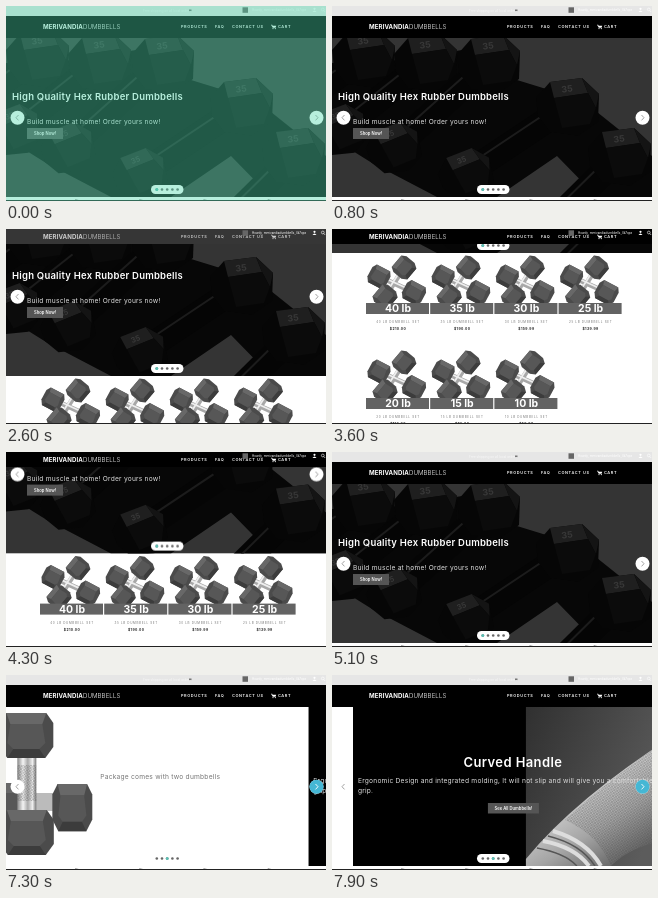
Write an HTML page that moves like this. It is 320x195 px and loops after 8 s.

```html
<!DOCTYPE html>
<html lang="en">
<head>
<meta charset="utf-8">
<title>Dumbbell shop</title>
<style>
  html, body { margin: 0; width: 100%; height: 100%; overflow: hidden; background: #fff; }
  svg.stage { display: block; width: 100vw; height: 100vh; font-family: Inter, "Open Sans", sans-serif; }
  :root { --t: 0ms; }

  /* Every animation is paused and positioned by the clock in --t. */
  .anim { animation: var(--name) var(--dur) var(--ease, linear) both paused; animation-delay: calc(var(--at) - var(--t)); }
  .tint   { --name: fade; --dur: 800ms; --at: 0ms; }
  .scroll { --name: scroll; --dur: 3200ms; --at: 1900ms; }
  .sticky { --name: sticky; --dur: 2400ms; --at: 2300ms; }
  .darken { --name: darken; --dur: 600ms; --at: 2300ms; }
  .menu   { --name: show; --dur: 400ms; --at: 2300ms; }
  .hover  { --name: show; --dur: 300ms; --at: 5800ms; }
  .first, .second { --name: slide; --dur: 880ms; --ease: cubic-bezier(.37, 0, .63, 1); }
  .first  { --at: 6286ms; }
  .second { --at: 7166ms; }
  .dot    { --name: hop; --dur: 1ms; }
  .dot.one { --at: 6286ms; }
  .dot.two { --at: 7166ms; }

  @keyframes fade { to { opacity: 0; } }
  @keyframes show { from { opacity: 0; } }
  @keyframes darken { from { fill: #6c6c6c; } to { fill: #000; } }
  @keyframes slide { to { transform: translateX(-320px); } }
  @keyframes hop { to { transform: translateX(5.2px); } }
  @keyframes scroll {
    0% { transform: none; animation-timing-function: cubic-bezier(.45, 0, .8, .6); }
    21.875% { transform: translateY(-44px); animation-timing-function: cubic-bezier(.3, .35, .6, 1); }
    53.125% { transform: translateY(-167px); }
    56.25% { transform: translateY(-168px); animation-timing-function: cubic-bezier(.45, 0, .4, 1); }
    100% { transform: none; }
  }
  @keyframes sticky {
    0%, 100% { opacity: 0; }
    10%, 90% { opacity: 1; }
  }

  .nav { fill: #fff; font-size: 3.9px; font-weight: 600; letter-spacing: .6px; }
  .logo { fill: #fff; font-size: 6.1px; font-weight: 300; letter-spacing: .09px; }
  .bold { font-weight: 700; }
  .title { fill: #fff; font-weight: 600; }
  .lead { fill: #ddd; font-size: 6.65px; letter-spacing: .22px; }
  .button { fill: #fff; font-size: 4.2px; font-weight: 600; }
  .mid { text-anchor: middle; }
  .weight { fill: #fff; font-size: 10.5px; font-weight: 700; }
  .name { fill: #777; font-size: 3px; letter-spacing: .65px; }
  .price { fill: #222; font-size: 3.4px; font-weight: 700; letter-spacing: .4px; }
</style>
</head>
<body>
<svg class="stage" viewBox="0 0 320 195" preserveAspectRatio="none">
  <defs>
    <linearGradient id="chrome">
      <stop offset="0" stop-color="#888"/><stop offset=".3" stop-color="#f4f4f4"/>
      <stop offset=".55" stop-color="#aaa"/><stop offset=".8" stop-color="#eee"/><stop offset="1" stop-color="#777"/>
    </linearGradient>
    <linearGradient id="backdrop" x2="1" y2=".4">
      <stop offset="0" stop-color="#303030"/><stop offset="1" stop-color="#5c5c5c"/>
    </linearGradient>
    <linearGradient id="grip" x1=".25" y1=".3" x2=".75" y2="1">
      <stop offset="0" stop-color="#777"/><stop offset=".25" stop-color="#c8c8c8"/>
      <stop offset=".55" stop-color="#a5a5a5"/><stop offset="1" stop-color="#555"/>
    </linearGradient>
    <pattern id="knurl" width="3" height="3" patternUnits="userSpaceOnUse" patternTransform="rotate(12)">
      <path d="M0 0L3 3M3 0L0 3" stroke="#444" stroke-width=".5" opacity=".55"/>
    </pattern>

    <!-- rubber head, dark, label on its upper facet -->
    <g id="head">
      <path d="M-32-8L-18-24 14-28 31-12 30 16 10 30-18 26-30 10Z" fill="#060606"/>
      <path d="M-18-24L14-28 20-13-14-8Z" fill="#1f1f1f"/>
      <path d="M14-28L31-12 28 2 20-13Z" fill="#141414"/>
      <path d="M-14-8L20-13 28 2 22 18-6 22Z" fill="#0b0b0b"/>
      <text class="mid" x="1" y="-14" font-size="9" font-weight="700" fill="#383838" transform="rotate(-7)">35</text>
    </g>

    <!-- rubber head, grey -->
    <g id="block">
      <path d="M-20-22H20L27-12V12L19 23H-19L-27 12V-12Z" fill="#4b4b4b"/>
      <path d="M-20-22H20L16-11H-16Z" fill="#686868"/>
      <path d="M-16-11H16L19 8 13 14H-13L-19 8Z" fill="#575757"/>
      <path d="M-13 14H13L19 23H-19Z" fill="#3c3c3c"/>
    </g>

    <g id="pair">
      <g fill="none" stroke-width="5" stroke="#a8a8a8">
        <path d="M12 20L47 36M37 11L18 41"/>
        <path d="M12 19L47 35M36 10L17 40" stroke="#eee" stroke-width="1.8"/>
      </g>
      <use href="#block" transform="translate(12 20) rotate(28) scale(.38 .44)"/>
      <use href="#block" transform="translate(37 11) rotate(-50) scale(.38 .44)"/>
      <use href="#block" transform="translate(18 40) rotate(-50) scale(.4 .44)"/>
      <use href="#block" transform="translate(47 36) rotate(28) scale(.4 .45)"/>
    </g>

    <g id="menu">
      <text class="logo" x="37" y="2.2"><tspan class="bold">MERIVANDIA</tspan>DUMBBELLS</text>
      <g class="nav">
        <text x="175" y="1.5">PRODUCTS</text>
        <text x="209" y="1.5">FAQ</text>
        <text x="226" y="1.5">CONTACT US</text>
        <text x="272" y="1.5">CART</text>
        <path d="M265-2h1.2l.4 1h3.6l-.7 2h-2.7z"/>
        <circle cx="267" cy="1.9" r=".6"/><circle cx="269.3" cy="1.9" r=".6"/>
      </g>
    </g>
  </defs>

  <rect width="320" height="195" fill="#fff"/>

  <g class="anim scroll">
    <rect width="320" height="11" fill="#e6e6e6"/>
    <text x="137" y="5.5" font-size="3.2" fill="#f8f8f8">Free shipping on all local orders</text>
    <rect x="183" y="3.5" width="2.5" height="1.6" fill="#777"/>
    <rect y="10" width="320" height="22" fill="#000"/>
    <use href="#menu" y="20.7"/>

    <g class="anim first"><g class="anim second">
      <svg y="32" width="320" height="159">
        <rect width="320" height="159" fill="#343434"/>
        <path d="M0 25L70 22 130 12 185 42 250 62 320 118V159H265L225 118 165 159H105L40 125 0 100Z" fill="#070707"/>
        <g id="rack"></g>
        <text class="title" x="6" y="62" font-size="9.5" letter-spacing=".22">High Quality Hex Rubber Dumbbells</text>
        <text class="lead" x="21" y="86">Build muscle at home! Order yours now!</text>
        <rect x="21" y="90" width="36" height="11" fill="#555"/>
        <text class="button mid" x="39" y="97">Shop Now!</text>
      </svg>

      <svg x="320" y="32" width="320" height="159">
        <rect width="320" height="159" fill="#fff"/>
        <rect x="20" y="86" width="70" height="18" fill="#bbb"/>
        <use href="#block" transform="translate(22 97) scale(.62 .95)"/>
        <use href="#block" transform="translate(84 100) scale(.74 1.05)"/>
        <rect x="29" y="46" width="19" height="60" fill="url(#chrome)"/>
        <rect x="29" y="58" width="19" height="36" fill="url(#knurl)"/>
        <use href="#block" transform="translate(38 28)"/>
        <use href="#block" transform="translate(38.5 125)"/>
        <text class="lead" x="112" y="72" style="fill:#777">Package comes with two dumbbells</text>
      </svg>

      <svg x="640" y="32" width="320" height="159">
        <rect width="320" height="159" fill="#000"/>
        <rect x="173" width="147" height="159" fill="url(#backdrop)"/>
        <g id="bar">
          <path d="M173 152Q222 92 320 29V132Q278 138 258 159H173Z" fill="url(#grip)"/>
          <path d="M212 113Q258 70 320 29V132Q278 138 258 159Q246 128 212 113Z" fill="url(#knurl)"/>
          <path d="M190 134Q222 140 236 159M200 124Q234 134 248 159" fill="none" stroke="#ddd" stroke-width="4"/>
          <path d="M195 129Q228 137 242 159M184 141Q212 146 224 159" fill="none" stroke="#555" stroke-width="1.5"/>
        </g>
        <text class="title mid" x="160" y="60" font-size="13" letter-spacing=".4">Curved Handle</text>
        <text class="lead" x="5" y="76">Ergonomic Design and integrated molding, It will not slip and will give you a comfortable</text>
        <text class="lead" x="5" y="86">grip.</text>
        <rect x="135" y="96" width="51" height="10.5" fill="#555"/>
        <text class="button mid" x="160.5" y="102.7">See All Dumbbells!</text>
      </svg>
    </g></g>

    <g fill="none" stroke="#999" stroke-width=".9">
      <circle cx="11.5" cy="111.7" r="7" fill="#fff" stroke="none"/>
      <path d="M12.5 109l-2.5 2.7 2.5 2.7"/>
      <circle cx="310.5" cy="111.7" r="7" fill="#fff" stroke="none"/>
      <path d="M309.5 109l2.5 2.7-2.5 2.7"/>
      <g class="anim hover">
        <circle cx="310.5" cy="111.7" r="7" fill="#45b7d4" stroke="none"/>
        <path d="M309.5 109l2.5 2.7-2.5 2.7" stroke="#fff"/>
      </g>
    </g>

    <rect x="145" y="179" width="32.5" height="9" rx="4.5" fill="#fff"/>
    <g id="dots" fill="#666"></g>
    <g class="anim dot one"><circle class="anim dot two" cx="150.8" cy="183.5" r="1.5" fill="#5cc0b4"/></g>

    <g id="shop"></g>
  </g>

  <g class="anim sticky">
    <rect class="anim darken" width="320" height="15"/>
    <g class="anim menu"><use href="#menu" y="7.7"/></g>
  </g>

  <g fill="#fff">
    <rect x="236.5" y="1.3" width="5.5" height="5.5" fill="#666"/>
    <text x="246" y="5" font-size="3.05">Howdy, merivandiadumbbells_4k7qpz</text>
    <circle cx="308.5" cy="2.8" r="1.1"/><path d="M306.5 6q2-3 4 0z"/>
    <circle cx="316.8" cy="3.5" r="1.4" fill="none" stroke="#fff" stroke-width=".6"/>
    <path d="M317.8 4.5l1.3 1.4" stroke="#fff" stroke-width=".7"/>
  </g>

  <rect y="194" width="320" height="1" fill="#222"/>
  <rect class="anim tint" width="320" height="195" fill="rgba(76, 215, 170, .4)"/>
</svg>

<script>
  const fill = (id, html) => document.getElementById(id).innerHTML = html;
  const use = (id, x, y, more = '') => `<use href="#${id}" transform="translate(${x} ${y}) ${more}"/>`;

  // Each dumbbell: far head x, y, near head x, y.
  const bells = [[32, 20, -40, 70], [94, 24, 8, 92], [157, 25, 62, 110], [236, 68, 134, 136], [288, 118, 215, 190]];
  fill('rack', bells.map(([x, y, u, v]) =>
    `<path d="M${x} ${y}L${u} ${v}" stroke="#050505" stroke-width="26"/>` +
    `<path d="M${x - 8} ${y - 2}L${u - 8} ${v - 2}" stroke="#1c1c1c" stroke-width="2"/>` +
    use('head', x, y) + use('head', u, v, 'rotate(-14) scale(.85)')).join(''));

  fill('dots', [0, 1, 2, 3, 4].map(i =>
    `<circle cx="${150.8 + i * 5.2}" cy="183.5" r="1.3"/>`).join(''));

  const prices = { 40: '210.00', 35: '190.00', 30: '159.99', 25: '139.99', 20: '110.00', 15: '85.00', 10: '59.99' };
  const weights = Object.keys(prices).map(Number).sort((a, b) => b - a);
  fill('shop', weights.map((lb, i) => {
    const x = 34 + i % 4 * 64.2, y = 191 + Math.floor(i / 4) * 95;
    return `<g transform="translate(${x} ${y})">
      <use href="#pair" x="1" y="3.5"/>
      <rect y="50" width="63" height="11" fill="#636363"/>
      <text class="weight mid" x="32" y="59.3">${lb} lb</text>
      <text class="name mid" x="32" y="70">${lb} LB DUMBBELL SET</text>
      <text class="price mid" x="32" y="77.2">$${prices[lb]}</text>
    </g>`;
  }).join(''));

  // Ten pictures a second.
  const LOOP = 8000, STEP = 100;
  function tick(now) {
    const t = Math.floor(now / STEP + .2) * STEP % LOOP;
    document.documentElement.style.setProperty('--t', t + 'ms');
    requestAnimationFrame(tick);
  }
  requestAnimationFrame(tick);
</script>
</body>
</html>
```
